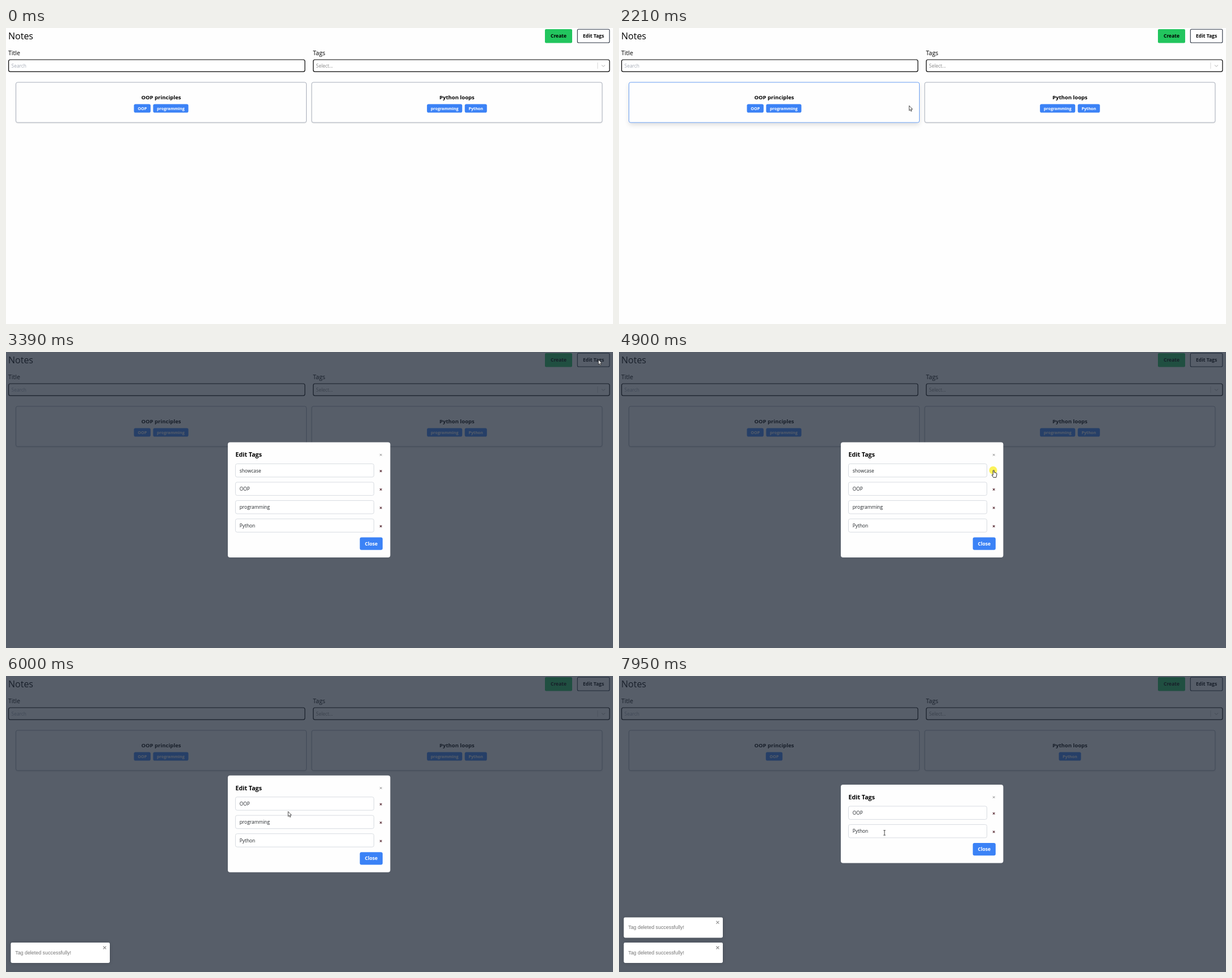
Recreate the animation shown at these times as an HTML page with a canvas. Size 1070 px wide and 523 px high, loop 8 s.

```html
<!DOCTYPE html>
<html lang="en">
<head>
<meta charset="utf-8">
<title>Notes</title>
<style>
html, body { margin: 0; width: 100%; height: 100%; overflow: hidden; background: #fefefe; }
canvas { display: block; }
</style>
</head>
<body>
<canvas id="stage" width="1070" height="523"></canvas>
<script>
const ctx = document.getElementById('stage').getContext('2d');
const LOOP = 8000;
const OPEN = 3390, DELETE_1 = 4970, DELETE_2 = 7320;
const CLICKS = [3190, 4765, 6845], CLICK_MS = 200;
const BLUE = '#3b82f6', PAPER = '#fefefe';
const UI = '"Open Sans", "Noto Sans", sans-serif';
const ARIAL = '"Liberation Sans", sans-serif';

// Pointer stops; it rests at each until `leave`, then eases to the next by `reach`
const STOPS = [
  { leave: 0, x: 690, y: 535 },
  { reach: 810, x: 705, y: 140 },
  { reach: 1600, x: 340, y: 128 },
  { reach: 2200, x: 510, y: 137 },
  { reach: 2480, x: 775, y: 80 },
  { reach: 3320, leave: 3590, x: 1044, y: 13 },
  { reach: 4350, x: 666, y: 169 },
  { reach: 4680, leave: 5170, x: 659, y: 208 },
  { reach: 6000, x: 497, y: 239 },
  { reach: 6300, x: 469, y: 248 },
  { reach: 6980, leave: DELETE_2, x: 659, y: 260 },
  { reach: 7930, x: 468, y: 277 }
];

const mix = (a, b, p) => a + (b - a) * p;

function pointerAt(t) {
  const i = STOPS.findIndex(stop => stop.reach > t);
  if (i < 0) return STOPS[STOPS.length - 1];
  const from = STOPS[i - 1], to = STOPS[i];
  const start = from.leave ?? from.reach;
  const p = Math.max(0, (t - start) / (to.reach - start));
  const e = p * p * (3 - 2 * p);
  return { x: mix(from.x, to.x, e), y: mix(from.y, to.y, e) };
}

function inside(pt, x, y, w, h) {
  return pt.x >= x && pt.x < x + w && pt.y >= y && pt.y < y + h;
}

function box(x, y, w, h, r, fill, stroke, line = 1) {
  ctx.beginPath();
  ctx.roundRect(x, y, w, h, r);
  if (fill) { ctx.fillStyle = fill; ctx.fill(); }
  if (stroke) { ctx.strokeStyle = stroke; ctx.lineWidth = line; ctx.stroke(); }
}

function shadowBox(x, y, w, h, r, fill, alpha, blur, dy) {
  ctx.save();
  ctx.shadowColor = `rgba(0,0,0,${alpha})`;
  ctx.shadowBlur = blur;
  ctx.shadowOffsetY = dy;
  box(x, y, w, h, r, fill);
  ctx.restore();
}

function text(str, x, base, size, color, weight = 400, align = 'left', family = UI) {
  ctx.font = `${weight} ${size}px ${family}`;
  ctx.textAlign = align;
  ctx.fillStyle = color;
  ctx.fillText(str, x, base);
}

function cross(x, y, r, color, line) {
  ctx.beginPath();
  ctx.moveTo(x - r, y - r); ctx.lineTo(x + r, y + r);
  ctx.moveTo(x + r, y - r); ctx.lineTo(x - r, y + r);
  ctx.strokeStyle = color;
  ctx.lineWidth = line;
  ctx.stroke();
}

function chips(tags, mid) {
  const size = 7.2, pad = 6.7, gap = 4.5;
  ctx.font = `700 ${size}px ${UI}`;
  const widths = tags.map(tag => ctx.measureText(tag).width + 2 * pad);
  let x = mid - (widths.reduce((a, b) => a + b) + gap * (tags.length - 1)) / 2;
  tags.forEach((tag, i) => {
    box(x, 134.5, widths[i], 15, 2.8, BLUE);
    text(tag, x + pad, 144.8, size, '#fff', 700);
    x += widths[i] + gap;
  });
}

function card(x, title, tags, pointer) {
  const y = 96, w = 512, h = 71, mid = x + w / 2;
  const hover = pointer && inside(pointer, x, y, w, h);
  shadowBox(x, y, w, h, 3, PAPER, 0.13, hover ? 8 : 2.5, hover ? 4 : 1);
  box(x, y, w, h, 3, PAPER, hover ? '#6ba0f3' : '#a9afbb');
  text(title, mid, 125.8, 9.5, '#000', 700, 'center');
  chips(tags, mid);
}

function field(x, label, hint, hintColor, border) {
  text(label, x, 47.7, 10.6, '#000');
  box(x + 0.6, 56, 522.3, 21.2, 3, '#fff', border, 1.2);
  text(hint, x + 5.6, 70.2, 8.4, hintColor);
}

// `pointer` is null while the modal blocks hovering
function page(pointer, untagged) {
  ctx.fillStyle = PAPER;
  ctx.fillRect(0, 0, 1070, 523);
  text('Notes', 4, 20, 16, '#000');
  box(950, 2, 48, 24.5, 2, '#22c55e');
  text('Create', 974, 17.3, 8.5, '#000', 700, 'center');
  box(1007.3, 2.3, 56.5, 23.7, 2, null, '#27303f', 1.1);
  text('Edit Tags', 1035.6, 17.3, 8.5, '#000', 700, 'center');

  const over = pointer && inside(pointer, 541, 55, 524, 23);
  field(4, 'Title', 'Search', '#a5abb6', '#000');
  field(541, 'Tags', 'Select...', '#868686', over ? '#b3b3b3' : '#000');
  ctx.fillStyle = '#ccc';
  ctx.fillRect(1042.5, 61, 0.8, 11);
  ctx.beginPath();
  ctx.moveTo(1050, 65.3); ctx.lineTo(1053, 68.3); ctx.lineTo(1056, 65.3);
  ctx.strokeStyle = '#c4c4c4';
  ctx.lineWidth = 1.1;
  ctx.stroke();

  const shared = untagged ? [] : ['programming'];
  card(17.5, 'OOP principles', ['OOP', ...shared], pointer);
  card(538.9, 'Python loops', [...shared, 'Python'], pointer);
}

// The modal stays centred and grows with its rows
const modalHeight = rows => 73.7 + 32.45 * rows.length;
const modalTop = rows => 261.3 - modalHeight(rows) / 2;
const rowY = (rows, i) => modalTop(rows) + 38 + 32.45 * i;

function modal(rows) {
  const top = modalTop(rows), h = modalHeight(rows);
  ctx.fillStyle = 'rgba(31,41,55,0.75)';
  ctx.fillRect(0, 0, 1070, 523);
  box(391, top, 286.4, h, 4, PAPER);
  text('Edit Tags', 404.4, top + 25.8, 10.7, '#000', 700);
  cross(660.7, top + 22.2, 1.7, '#777', 0.9);
  rows.forEach((name, i) => {
    const y = rowY(rows, i);
    box(404.5, y, 244, 23.4, 3, '#fff', '#d8dce1');
    text(name, 411.7, y + 15, 8.4, '#212529');
    cross(660.7, y + 12.9, 1.7, '#54262f', 1.1);
  });
  box(623.7, top + h - 35.6, 40.2, 22.2, 3, BLUE);
  text('Close', 643.8, top + h - 21.4, 8.6, '#fff', 700, 'center');
}

// Fly in from the left, overshoot, then a fading wobble
function slide(p) {
  if (p >= 1) return 0;
  if (p < 0.6) return 14 - 1685 * (1 - p / 0.6) ** 3;
  return 14 * ((1 - p) / 0.4) ** 2 * Math.cos((p - 0.6) / 0.3 * 2 * Math.PI);
}

function toast(age, y) {
  const x = 8.4 + slide(age / 700);
  shadowBox(x, y, 174.6, 36, 2.4, '#fff', 0.16, 6, 0.6);
  text('Tag deleted successfully!', x + 7.8, y + 20.7, 8.9, '#757575', 400, 'left', ARIAL);
  cross(x + 165.5, y + 9, 2.5, '#8d8d8d', 1.1);
}

const ARROW = new Path2D('M.3 .5v8.7l1.9-1.8 1.3 3 1.4-.6-1.3-2.9 2.6-.2z');
const BEAM = new Path2D('M-1.8-4.2h3.6M0-4.2v8.4M-1.8 4.2h3.6');
const HAND = new Path2D('M.3 1.6q1-1.2 2 0v3.2l4 1q.8 .4 .6 3.2l-1 4.6h-5l-2.6-4q-.2-1.6 2 0z');

function stroke(path, color, line, fill) {
  if (fill) { ctx.fillStyle = fill; ctx.fill(path); }
  ctx.strokeStyle = color;
  ctx.lineWidth = line;
  ctx.stroke(path);
}

const CURSORS = {
  arrow: () => stroke(ARROW, '#222', 0.8, '#fff'),
  hand: () => stroke(HAND, '#111', 0.85, '#fff'),
  beam: () => stroke(BEAM, '#333', 0.9)
};

function cursorKind(pointer, rows) {
  if (inside(pointer, 655, modalTop(rows) + 16, 12, 12)) return 'hand';
  for (let i = 0; i < rows.length; i++) {
    const y = rowY(rows, i);
    if (inside(pointer, 404, y, 245, 23.4)) return 'beam';
    if (inside(pointer, 655, y + 5, 12, 15)) return 'hand';
  }
  return 'arrow';
}

function drawPointer(pointer, kind, pressed) {
  ctx.save();
  ctx.translate(pointer.x, pointer.y);
  if (pressed) {
    ctx.beginPath();
    ctx.arc(0.5, 1, 7, 0, Math.PI * 2);
    ctx.fillStyle = 'rgba(250,236,20,0.7)';
    ctx.fill();
  }
  CURSORS[kind]();
  ctx.restore();
}

function draw(t) {
  const pointer = pointerAt(t), open = t >= OPEN;
  const gone = [t >= DELETE_1 && 'showcase', t >= DELETE_2 && 'programming'];
  const rows = ['showcase', 'OOP', 'programming', 'Python'].filter(tag => !gone.includes(tag));

  page(open ? null : pointer, t >= DELETE_2);
  if (open) modal(rows);
  if (t >= DELETE_1) toast(t - DELETE_1 - 160, t >= DELETE_2 ? 426.4 : 471);
  if (t >= DELETE_2) toast(t - DELETE_2 + 70, 471);

  const pressed = CLICKS.some(at => t >= at && t < at + CLICK_MS);
  drawPointer(pointer, open ? cursorKind(pointer, rows) : 'arrow', pressed);
}

const begin = performance.now();
function tick() {
  draw((performance.now() - begin) % LOOP);
  requestAnimationFrame(tick);
}
tick();
</script>
</body>
</html>
```
